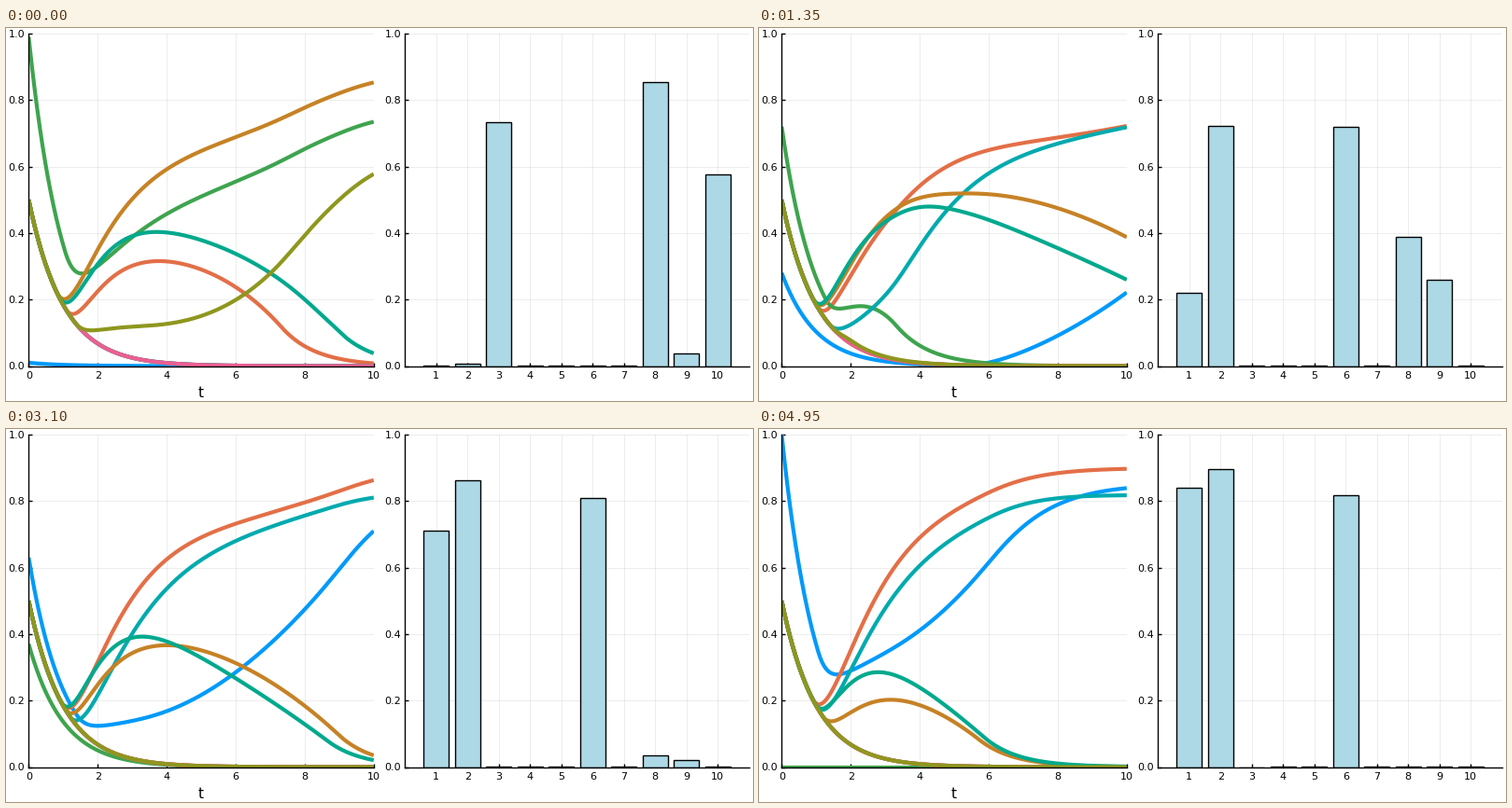
Recreate the animation shown at these times as a matplotlib script. Size 800 px wide and 400 px high, loop 5 s.

```python
import numpy as np
import matplotlib.pyplot as plt
from matplotlib.animation import FuncAnimation

W, H, DPI = 800, 400, 100
FRAMES, INTERVAL = 100, 50
T_END, STEPS = 10, 500

COLORS = ["#009AFA", "#E36F47", "#3EA44E", "#C371D2", "#AC8E18",
          "#00AAAE", "#ED5E93", "#C68225", "#00A98D", "#8E971E"]

# Units (0-based) that can be re-excited; the rest only decay.
ACTIVE = np.array([0, 1, 2, 5, 7, 8, 9])
DORMANT = np.array([3, 4, 6])

# Mutual inhibition between active units, upper triangle row by row.
PAIRS = [0.044, 2.0, 0.133, 0.96, 0.78, 0.8,
         0.5, 0.077, 0.405, 0.135, 1.13,
         1.65, 0.045, 0.55, 0.305,
         0.095, 0.53, 1.1,
         0.36, 0.125,
         0.62]
# Total inhibition each active unit receives from the dormant ones.
FROM_DORMANT = np.array([3.0, 2.95, 2.6, 3.2, 3.35, 1.95, 3.35])


def build_network():
    weights = np.zeros((10, 10))
    rows, cols = np.triu_indices(len(ACTIVE), 1)
    weights[ACTIVE[rows], ACTIVE[cols]] = PAIRS
    weights += weights.T
    weights[np.ix_(ACTIVE, DORMANT)] = FROM_DORMANT[:, None] / 3
    bias = np.zeros(10)
    bias[ACTIVE] = 1
    return weights, bias


def simulate(start):
    """Integrate x' = -x + max(0, bias - Wx) for all start rows at once."""
    weights, bias = build_network()

    def rate(x):
        return np.maximum(0, bias - x @ weights.T) - x

    dt = T_END / STEPS
    path = [start]
    for _ in range(STEPS):
        x = path[-1]
        k1 = rate(x)
        k2 = rate(x + dt / 2 * k1)
        k3 = rate(x + dt / 2 * k2)
        k4 = rate(x + dt * k3)
        path.append(x + dt / 6 * (k1 + 2 * k2 + 2 * k3 + k4))
    return np.array(path)


def add_panel(fig, left, right, xlim, xticks):
    top, bottom = 6, 362.5
    ax = fig.add_axes([left / W, 1 - bottom / H,
                       (right - left) / W, (bottom - top) / H])
    ax.set(xlim=xlim, ylim=(0, 1), xticks=xticks,
           yticks=np.linspace(0, 1, 6))
    ax.spines[["top", "right"]].set_visible(False)
    ax.spines[["left", "bottom"]].set_linewidth(1)
    ax.set_axisbelow(True)
    ax.grid(color="black", alpha=0.1, linewidth=0.5)
    ax.tick_params(direction="in", length=3, width=1, labelsize=8)
    ax.tick_params(axis="x", pad=4)
    ax.tick_params(axis="y", pad=3)
    return ax


plt.rcParams["font.family"] = "DejaVu Sans"

share = np.arange(1, FRAMES + 1) / FRAMES
start = np.full((FRAMES, 10), 0.5)
start[:, 0] = share
start[:, 2] = 1 - share
paths = simulate(start)
times = np.linspace(0, T_END, STEPS + 1)

fig = plt.figure(figsize=(W / DPI, H / DPI), dpi=DPI, facecolor="white")
curves_ax = add_panel(fig, 24.3, 393.8, (0, T_END), range(0, 11, 2))
bars_ax = add_panel(fig, 427.3, 795.8, (0, 11), range(1, 11))
fig.text(209 / W, 1 - 395.5 / H, "t", size=11, ha="center", va="baseline")

lines = [curves_ax.plot([], [], color=c, lw=3, solid_capstyle="butt")[0]
         for c in COLORS]
bars = bars_ax.bar(range(1, 11), np.zeros(10), width=0.8,
                   color="lightblue", edgecolor="black", linewidth=1)


def update(i):
    for unit, (line, bar) in enumerate(zip(lines, bars)):
        line.set_data(times, paths[:, i, unit])
        bar.set_height(paths[-1, i, unit])
    return [*lines, *bars]


anim = FuncAnimation(fig, update, frames=FRAMES, interval=INTERVAL,
                     repeat=True, repeat_delay=0)
plt.show()
```
